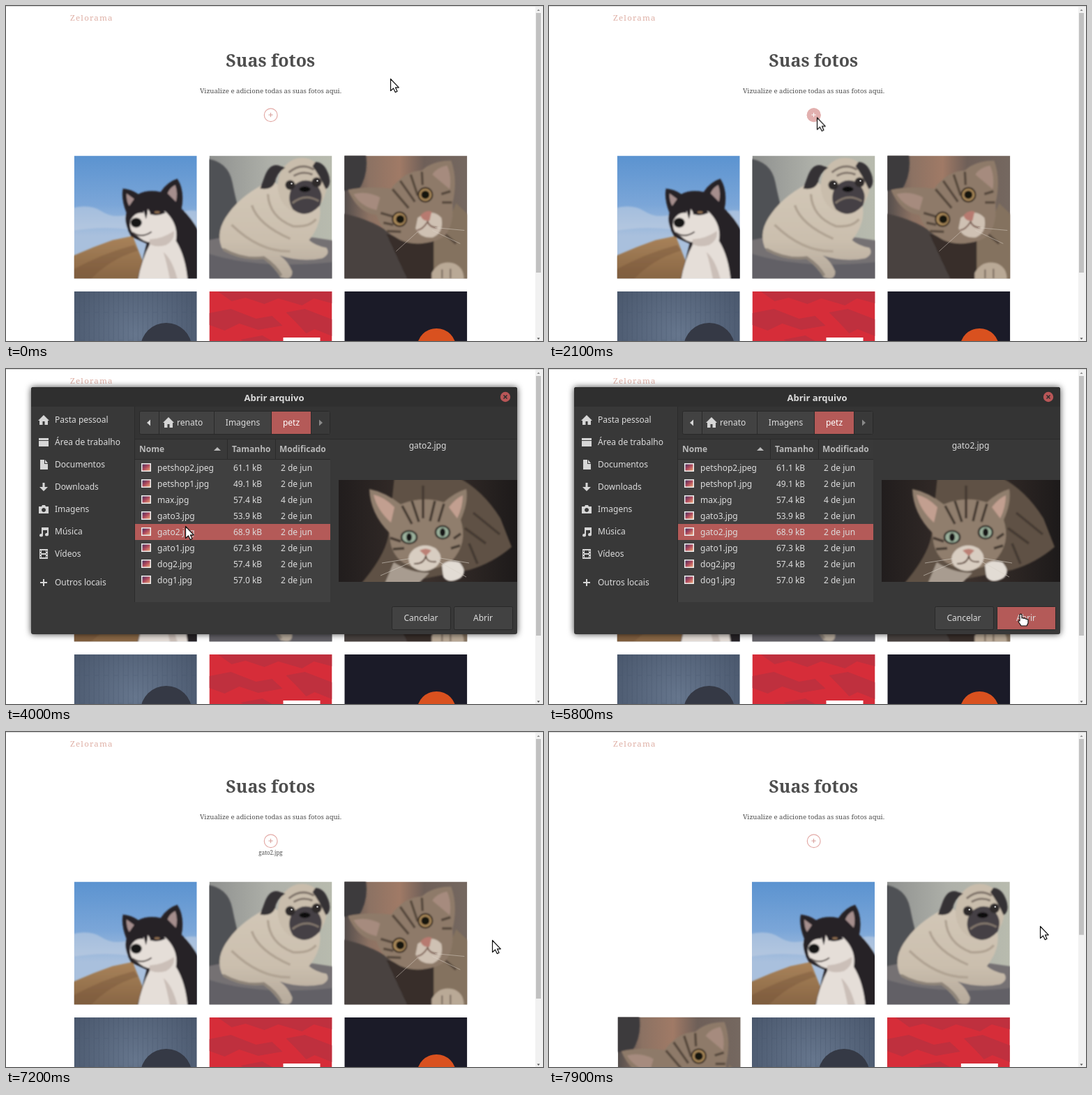
Write an HTML page that moves like this. It is 770 px wide and 480 px high and loops after 8 s.

```html
<!DOCTYPE html>
<html lang="pt-BR">
<head>
<meta charset="utf-8">
<title>Suas fotos</title>
<style>
@property --p { syntax: "<number>"; inherits: true; initial-value: 0; }
html, body { margin: 0; width: 100%; height: 100%; overflow: hidden; background: #fff; }
svg { display: block; }
#stage { width: 770px; height: 480px; }
.page { font-family: "Noto Serif", serif; fill: #4e4e4e; }
.mid { text-anchor: middle; }
.dialog { font: 12px "Noto Sans", sans-serif; fill: #dcdcdc; }
.bold { font-weight: 700; }
.edge { stroke: #292929; fill: #424242; }
.icon { fill: #d6d6d6; }
.shadow { filter: drop-shadow(0 0 5px rgba(0,0,0,.75)); }

/* one shared 8 s clock, hard changes unless a keyframe says otherwise */
.dialog, .hover, .file, .bar, .thumb, #grid, .pick, .first, .second, .press, .arrow, .hand, .cursor {
  animation: 8s step-end infinite;
}
.dialog { animation-name: dialog; }
.hover { animation-name: hover; }
.file { animation-name: file; }
.bar { animation-name: bar; transform-origin: 92px 0; }
.thumb { animation-name: thumb; transform-origin: 0 10px; }
#grid { animation-name: reflow; }
.pick { animation-name: pick; }
.first { animation-name: first; }
.second { animation-name: second; }
.press { animation-name: press; }
.arrow { animation-name: arrow; }
.hand { animation-name: press; }
.cursor { animation-name: cursor; }

/* tiles slide one slot further as --p goes from 0 to 1 */
.tile {
  --dc: 1; --dr: 0;
  transform: translate(
    calc(97.7px + (var(--c) + var(--p) * var(--dc)) * 193.8px),
    calc(214.5px + (var(--r) + var(--p) * var(--dr)) * 194.4px));
}
.tile.wrap { --dc: -2; --dr: 1; }

@keyframes dialog {
  0% { opacity: 0 } 27.5% { opacity: .55 } 28.75% { opacity: 1 }
  73.75% { opacity: .6 } 75% { opacity: .2 } 76.25%, 100% { opacity: 0 }
}
@keyframes hover { 0% { opacity: 0 } 16.25% { opacity: 1 } 75%, 100% { opacity: 0 } }
@keyframes file { 0% { opacity: 0 } 77.5% { opacity: 1 } 93.75%, 100% { opacity: 0 } }
@keyframes bar {
  0% { transform: scaleX(0) } 91.25% { transform: scaleX(.35) }
  92.5% { transform: scaleX(1) } 93.75%, 100% { transform: scaleX(0) }
}
@keyframes thumb { 0% { transform: none } 93.75%, 100% { transform: scaleY(.755) } }
@keyframes reflow {
  0% { --p: 0 } 95% { --p: .216 } 96.25% { --p: .758 }
  97.5% { --p: .939 } 98.75%, 100% { --p: .9974 }
}
@keyframes pick { 0% { transform: none } 50%, 100% { transform: translateY(92px) } }
@keyframes first { 0% { opacity: 1 } 50%, 100% { opacity: 0 } }
@keyframes second { 0% { opacity: 0 } 50%, 100% { opacity: 1 } }
@keyframes press { 0% { opacity: 0 } 66.25% { opacity: 1 } 76.25%, 100% { opacity: 0 } }
@keyframes arrow { 0% { opacity: 1 } 66.25% { opacity: 0 } 76.25%, 100% { opacity: 1 } }
@keyframes cursor {
  0% { transform: translate(551px,104px); animation-timing-function: steps(4) }
  5% { transform: translate(470px,130px); animation-timing-function: steps(5) }
  11.25% { transform: translate(399px,155px); animation-timing-function: steps(8) }
  21.25% { transform: translate(384px,159.5px) }
  37.5% { transform: translate(284px,222px); animation-timing-function: steps(4) }
  42.5%, 52.5% { transform: translate(257px,225px) }
  52.5% { animation-timing-function: steps(9) }
  63.75% { transform: translate(628px,336px) }
  66.25%, 76.25% { transform: translate(678px,352px) }
  76.25% { animation-timing-function: steps(2) }
  78.75%, 83.75% { transform: translate(682px,345px) }
  83.75% { animation-timing-function: steps(5) }
  90% { transform: translate(697px,298px); animation-timing-function: steps(4) }
  95%, 100% { transform: translate(704px,278px) }
}
</style>
</head>
<body>
<svg id="stage" viewBox="0 0 770 480">
<defs>
  <linearGradient id="sky" x2="0" y2="1"><stop stop-color="#5b93d0"/><stop offset=".4" stop-color="#7ba6d8"/><stop offset=".65" stop-color="#a9c0dd"/></linearGradient>
  <linearGradient id="hill" x2="0" y2="1"><stop stop-color="#a9835a"/><stop offset="1" stop-color="#866443"/></linearGradient>
  <linearGradient id="wall"><stop stop-color="#8f918f"/><stop offset=".5" stop-color="#aeb0a9"/><stop offset="1" stop-color="#b8bbae"/></linearGradient>
  <linearGradient id="room"><stop stop-color="#554e4c"/><stop offset=".2" stop-color="#8c7263"/><stop offset=".45" stop-color="#a07a66"/><stop offset=".65" stop-color="#6e5f58"/><stop offset="1" stop-color="#756860"/></linearGradient>
  <linearGradient id="dusk"><stop stop-color="#211d1d"/><stop offset=".5" stop-color="#3a302c"/><stop offset="1" stop-color="#1d1a1a"/></linearGradient>
  <linearGradient id="coat" x2="0" y2="1"><stop stop-color="#d2c7b7"/><stop offset=".6" stop-color="#cbbfae"/><stop offset="1" stop-color="#b5a99b"/></linearGradient>
  <radialGradient id="wood" cy=".35" r=".75"><stop stop-color="#66768d"/><stop offset="1" stop-color="#435065"/></radialGradient>
  <linearGradient id="thumbnail" x2="1" y2="1"><stop stop-color="#493060"/><stop offset=".5" stop-color="#b0495c"/><stop offset="1" stop-color="#e9a374"/></linearGradient>
  <filter id="soft"><feGaussianBlur stdDeviation="1.3"/></filter>
  <filter id="soften"><feGaussianBlur stdDeviation=".8"/></filter>
  <pattern id="planks" width="14" height="90" patternUnits="userSpaceOnUse"><path d="M.5 0V90M7.5 0V90M0 30H7M7 70H14" stroke="#35445b" opacity=".22"/></pattern>
  <pattern id="goods" width="24" height="17" patternUnits="userSpaceOnUse">
    <path fill="#d8d5d0" d="M0 0H24V17H0z"/><path fill="#b73b3a" d="M0 2H7V14H0z"/><path fill="#35588c" d="M8 4H14V14H8z"/><path fill="#d5a63c" d="M15 1H19V14H15z"/><path fill="#564b54" d="M20 5H24V14H20zM0 15H24V17H0z"/>
  </pattern>

  <symbol id="husky" viewBox="0 0 176 176">
    <path fill="url(#sky)" d="M0 0H176V176H0z"/>
    <g filter="url(#soft)">
      <path fill="#c3cfe2" opacity=".55" d="M-5 76Q22 68 40 80T84 82V106Q40 100-5 108zM150 82Q164 76 181 80V108H150z"/>
      <path fill="url(#hill)" d="M-5 145L28 131L55 121L84 115L110 181H-5z"/>
      <path fill="#66482f" opacity=".3" d="M-5 165Q40 140 86 128L92 136Q50 148 20 181H-5z"/>
      <path fill="#272427" d="M70 47Q67 62 75 82Q70 95 82 116L104 126L90 181H181V112Q168 88 154 76Q159 50 148 33Q134 37 124 52Q106 48 92 55Q82 48 70 47z"/>
      <path fill="#a58e8d" d="M75 54Q75 66 79 72L86 62zM145 42Q137 46 134 54L146 66Q149 54 145 42z"/>
      <path fill="#e5ded8" d="M99 82Q88 80 81 92Q77 109 91 115Q100 124 110 124Q96 150 91 181H163Q160 144 146 122Q150 98 131 80Q118 74 109 82Q103 68 99 82z"/>
      <path fill="#cbbfb8" d="M108 120Q127 119 143 108Q145 120 132 128Q120 132 108 127zM128 138Q142 150 149 181H138Q134 158 128 138z"/>
      <path fill="#272427" d="M104 56Q108 77 103 91Q98 77 99 57zM109 79Q123 69 131 82Q120 87 109 84z"/>
      <ellipse cx="89" cy="96" rx="8" ry="7" fill="#151416"/>
      <ellipse cx="119" cy="81" rx="4" ry="1.8" fill="#8a6a4d"/>
      <path d="M84 110Q97 119 111 109" fill="none" stroke="#4a403d" stroke-width="2"/>
    </g>
  </symbol>

  <symbol id="pug" viewBox="0 0 176 176">
    <path fill="url(#wall)" d="M0 0H176V176H0z"/>
    <g filter="url(#soft)">
      <path fill="#505155" d="M-5 4Q27 8 33 38T43 78L16 118L-5 126z"/>
      <path fill="#757173" d="M-5 122Q70 103 181 122V181H-5z"/>
      <path fill="#626066" d="M-5 139Q70 164 181 152V181H-5z"/>
      <path fill="url(#coat)" d="M88 36Q48 54 28 82Q8 108 18 132Q43 150 76 146Q94 160 102 174Q119 180 119 166Q113 151 101 143Q132 153 162 147Q174 141 168 132Q152 129 143 121Q163 96 158 70z"/>
      <path d="M84 55Q86 88 120 101Q143 103 153 91M61 71Q70 99 116 119M32 99Q72 138 116 137" fill="none" stroke="#b0a393" stroke-width="3.5"/>
      <path d="M20 134Q48 150 78 146Q96 158 103 172" fill="none" stroke="#8e8479" stroke-width="4"/>
      <ellipse cx="133" cy="43" rx="35" ry="40" fill="#c9bdac"/>
      <path fill="#353134" d="M102 15Q88 9 80 28L73 47Q89 50 94 39Q96 25 109 17zM152 9Q166 9 172 30Q175 43 167 48Q158 28 148 15z"/>
      <path fill="#454044" d="M119 45Q133 30 150 38Q167 53 158 72Q139 92 120 77Q110 62 119 45z"/>
      <circle cx="116" cy="42" r="7" fill="#2e292c"/><circle cx="154" cy="38" r="7" fill="#2e292c"/>
      <path d="M114 24Q132 9 150 20M121 29Q134 21 148 27M119 68Q137 53 157 65" fill="none" stroke="#80746b" stroke-width="3"/>
      <ellipse cx="137" cy="48" rx="8" ry="4" fill="#111"/>
    </g>
    <circle cx="118" cy="40" r="1.3" fill="#ccc"/><circle cx="155" cy="36" r="1.3" fill="#ccc"/>
  </symbol>

  <symbol id="tabby" viewBox="0 0 176 176">
    <path fill="url(#room)" d="M0 0H176V176H0z"/>
    <g filter="url(#soft)">
      <path fill="#3c3b3e" d="M-5-5H30Q36 25 20 50H-5z"/>
      <path fill="#4a4341" d="M-5 82Q45 92 75 118L112 181H-5z"/>
      <path fill="#382f2c" d="M60 112L104 120L140 122L128 181H92z"/>
      <path fill="#84725f" d="M128 120Q152 92 160 68L181 88V181H128z"/>
      <path fill="#8e7a69" d="M5 49Q29 43 67 47Q86 22 111 21Q126 7 153 7Q163 34 155 68Q158 112 133 121Q96 133 72 116Q51 105 46 85Q19 82 5 49z"/>
      <path fill="#a68b7e" d="M13 55Q33 50 51 60L46 78Q24 73 13 55zM147 14Q132 17 126 27L151 48Q154 29 147 14z"/>
      <path fill="none" stroke="#57483d" stroke-width="3.5" d="M69 48L92 75M80 36L101 66M95 27L105 57M111 23L112 42M52 82L69 87M56 96L70 99M61 108L81 109M139 55L152 51M140 67L154 67M145 113L160 126"/>
      <path fill="#cfc1b3" d="M105 89Q126 74 139 89Q143 110 127 117Q109 119 102 104z"/>
      <g stroke="#30261f" stroke-width="2" fill="#a98858"><circle cx="79" cy="91" r="10"/><circle cx="116" cy="56" r="10"/></g>
      <circle cx="80" cy="91" r="6" fill="#17120f"/><circle cx="116" cy="56" r="6" fill="#17120f"/>
      <path fill="#b77a70" d="M109 86Q116 77 125 80L122 93Q113 95 109 86z"/>
      <path d="M119 93Q121 103 133 103M119 95Q112 106 104 107" fill="none" stroke="#7a5b50" stroke-width="2"/>
      <path fill="#b9a996" d="M125 168Q136 149 156 154Q173 160 171 181H125z"/>
      <path d="M140 163V176M152 162V176" stroke="#75665a" stroke-width="2"/>
    </g>
    <path d="M126 107L166 126M130 103L172 107M105 109L74 137" stroke="#ddd3c9" stroke-width=".5"/>
  </symbol>

  <symbol id="planked" viewBox="0 0 176 176">
    <path fill="url(#wood)" d="M0 0H176V176H0z"/><path fill="url(#planks)" d="M0 0H176V176H0z"/>
    <circle cx="132" cy="82" r="37" fill="#353945"/>
  </symbol>
  <symbol id="crimson" viewBox="0 0 176 176">
    <path fill="#d62d39" d="M0 0H176V176H0z"/>
    <path fill="#bf303e" d="M12 0H176V17L150 10L133 20L99 10L79 18L52 9L32 14zM110 30L137 25L176 40V64L151 54L139 60L123 43zM0 31L31 25L67 39L90 35L105 49L70 55L43 46L22 56L0 48zM45 69L76 63L99 76L67 82z"/>
    <path fill="#fff" d="M106 66h53v53h-53z"/>
  </symbol>
  <symbol id="navy" viewBox="0 0 176 176">
    <path fill="#1b1b28" d="M0 0H176V176H0z"/><circle cx="132" cy="81" r="28" fill="#d9511f"/>
  </symbol>
</defs>

<path fill="#fff" d="M0 0H770V480H0z"/>
<path fill="#d9d9d9" d="M0 0H770V1H0z"/>
<g class="page">
  <text x="92" y="21" font-size="11.5" letter-spacing="1.2" fill="#dfb0a6">Zelorama</text>
  <text class="mid bold" x="379.2" y="86.5" font-size="24.96">Suas fotos</text>
  <text class="mid" x="379.5" y="125" font-size="9.6">Vizualize e adicione todas as suas fotos aqui.</text>
  <circle cx="379.7" cy="156.2" r="9.4" fill="#fff" stroke="#e3aaa6" stroke-width="1.2"/>
  <path d="M376.5 156H382.7M379.6 152.9V159.1" stroke="#d79c98"/>
  <g class="hover"><circle cx="379.7" cy="156.2" r="10" fill="#e2b0af"/><path d="M376.5 156H382.7M379.6 152.9V159.1" stroke="#fff"/></g>
  <text class="mid file" x="379.5" y="176" font-size="8">gato2.jpg</text>
  <path class="bar" fill="#e7b4b0" d="M92 190H668V193H92z"/>
</g>

<g id="grid">
  <g class="tile" style="--c:0;--r:0"><use href="#husky" width="176" height="176"/></g>
  <g class="tile" style="--c:1;--r:0"><use href="#pug" width="176" height="176"/></g>
  <g class="tile wrap" style="--c:2;--r:0"><use href="#tabby" width="176" height="176"/></g>
  <g class="tile" style="--c:0;--r:1"><use href="#planked" width="176" height="176"/></g>
  <g class="tile" style="--c:1;--r:1"><use href="#crimson" width="176" height="176"/></g>
  <g class="tile wrap" style="--c:2;--r:1"><use href="#navy" width="176" height="176"/></g>
</g>

<path fill="#f1f1f1" d="M759 1H770V480H759z"/>
<path class="thumb" fill="#c1c1c1" d="M760 10H767V382H760z"/>
<path fill="#8b8b8b" d="M761.5 7L763.5 4.5L765.5 7z"/><path fill="#505050" d="M761.5 475.5H765.5L763.5 478z"/>

<g class="dialog">
  <rect class="shadow" x="36" y="26" width="697" height="354" rx="3" fill="#383838"/>
  <path fill="#2f2f2f" d="M36 54V29Q36 26 39 26H730Q733 26 733 29V54z"/>
  <path fill="#343434" d="M185 54H733V100H185z"/>
  <path fill="#404040" d="M185 130H465V334H185z"/>
  <path fill="#393939" d="M185 101H465V129H185z"/>
  <path d="M184.5 54V334M185 100.5H733M185 129.5H465M317.5 101V129M386.5 101V129" stroke="#2b2b2b"/>
  <text class="mid bold" x="384.5" y="45.5" font-size="13">Abrir arquivo</text>
  <circle cx="716" cy="40" r="7.2" fill="#b95657"/>
  <path d="M713.5 37.5l5 5m0-5l-5 5" stroke="#2f2f2f" stroke-width="1.6"/>

  <g id="places"></g>

  <rect class="edge" x="191.5" y="60.5" width="273" height="33" rx="2"/>
  <path fill="#b45a58" d="M381 61H437V93H381z"/>
  <path fill="#393939" d="M438 61H464V93H438z"/>
  <path d="M219.5 61V93M298.5 61V93M380.5 61V93M437.5 61V93" stroke="#292929"/>
  <path class="icon" d="M207 72.5V81.5L202 77z"/><path fill="#8a8a8a" d="M449 72.5V81.5L454 77z"/>
  <path class="icon" d="M233 69L225 77H227V84H231.5V79H234.5V84H239V77H241z"/>
  <text x="245" y="81">renato</text>
  <text class="mid" x="339.5" y="81">Imagens</text>
  <text class="mid" x="409" y="81" fill="#fff">petz</text>

  <g class="bold" fill="#b9b9b9">
    <text x="191" y="119">Nome</text><text x="324" y="119">Tamanho</text><text x="392" y="119">Modificado</text>
    <path d="M298 117L303 112L308 117z"/>
  </g>
  <path class="pick" fill="#b45a58" d="M185 130H465V153H185z"/>
  <g id="files"></g>

  <g class="first">
    <text class="mid" x="604.5" y="114">petshop2.jpeg</text>
    <svg x="477" y="160" width="256" height="144" viewBox="0 0 256 144">
      <path fill="#c8cfc9" d="M0 0H256V144H0z"/>
      <g filter="url(#soften)">
        <path fill="#6f9b75" d="M-5-5H38L64 29V44L-5 36zM261-5H205L168 30V43L261 25z"/>
        <path fill="#92809f" d="M-5 34L63 43V86L-5 94zM145 45L261 23V76L145 63z"/>
        <path fill="#a9b0ab" d="M-5 94L88 77H155L261 111V149H-5z"/>
        <path fill="#5e6362" d="M64 43H146V86H64z"/><path fill="#c9d2cf" d="M68 46H85V82H68zM93 55H114V82H93z"/>
        <path fill="#363a3b" d="M116 50H143V82H116z"/>
        <path fill="url(#goods)" d="M-5 33L60 46V96L37 108L32 149H-5zM146 43L261 34V149H163L144 88z"/>
        <path fill="#b9905f" d="M74 82H93V105H74z"/><path fill="#e0b645" d="M83 106L107 98L114 122L92 129zM182 118L206 106L221 137L194 144z"/>
        <path fill="#e8e6df" d="M132 113L154 105L165 139H137zM0 94L22 87L34 117L6 124zM216 116L237 108L254 144H220z"/>
        <path d="M102 9L148 7M91 20L145 19" stroke="#fff" stroke-width="3"/><path d="M19 9L58 18M43 7L37 20" stroke="#484e4c" stroke-width="3"/>
      </g>
    </svg>
  </g>
  <g class="second">
    <text class="mid" x="604.5" y="114">gato2.jpg</text>
    <svg x="477" y="159" width="256" height="146" viewBox="0 0 256 146">
      <path fill="url(#dusk)" d="M0 0H256V146H0z"/>
      <g filter="url(#soften)">
        <path fill="#5f5145" d="M80-5H168Q205 12 232 55L248 96Q221 119 187 129L72 151H30Q65 111 71 81z"/>
        <path fill="#907e6d" d="M44 13Q66 17 89 35Q119 22 151 32Q166 18 183 13Q186 33 175 57Q186 91 162 116Q127 139 92 118Q73 105 73 76Q45 48 44 13z"/>
        <path fill="#c29f90" d="M50 21Q65 24 80 39L75 61Q55 43 50 21zM178 22Q167 27 158 39L170 55Q178 39 178 22z"/>
        <path fill="none" stroke="#453a32" stroke-width="3.5" d="M91 37L105 63M105 30L115 60M121 8V55M138 30L131 59M151 34L143 60M74 83L89 88M78 99L94 98M165 84L175 77M161 98L174 94M181 69L211 91M193 47L231 78M187 91L199 120"/>
        <path fill="#d8cdc1" d="M108 99Q123 89 139 98Q153 111 140 124Q123 137 105 124Q94 111 108 99z"/>
        <path fill="#e2dcd4" d="M148 122Q156 113 173 118Q186 132 174 141Q158 150 150 139z"/>
        <path fill="#a89c90" d="M79 118Q102 133 130 133L112 151H65z"/>
        <g fill="#9bb19c" stroke="#262522" stroke-width="2.5"><ellipse cx="101" cy="82" rx="11" ry="9"/><ellipse cx="149" cy="75" rx="10" ry="9"/></g>
        <g fill="#141414"><ellipse cx="101" cy="82" rx="4" ry="6"/><ellipse cx="149" cy="75" rx="4" ry="6"/></g>
        <path fill="#bb8074" d="M116 101Q125 96 133 101L125 109z"/>
        <path d="M125 108Q126 119 140 117M125 109Q122 121 108 120" fill="none" stroke="#644d42" stroke-width="2"/>
      </g>
      <path d="M106 112L62 119M108 116L60 137M140 111L187 119M140 115L183 139" stroke="#d7d0c7" stroke-width=".6"/>
    </svg>
  </g>

  <rect class="edge" x="553.5" y="340.5" width="84" height="33" rx="2"/>
  <rect class="edge" x="642.5" y="340.5" width="84" height="33" rx="2"/>
  <path class="press" fill="#b45a58" d="M643 341H726V373H643z"/>
  <text class="mid" x="595" y="361">Cancelar</text><text class="mid" x="684" y="361">Abrir</text>
</g>

<g class="cursor" fill="#fff" stroke="#111" stroke-width="1.2" stroke-linejoin="round">
  <path class="arrow" d="M.5 .5V17.5L4.5 14L7.2 19.6L10 18.3L7.4 12.8H12.3z"/>
  <path class="hand" d="M-3 0Q-1.5 -1.5 0 0V5L2 4.5L3 5.5L5 5L6 6.5Q9 6 9 8V12L7 16H-1L-5 10Q-5 8 -3 9z"/>
</g>
</svg>

<script>
const house = "M0-7L-8 1H-6V7H-1.5V2H1.5V7H6V1H8z";
const places = [
  ["Pasta pessoal", house],
  ["Área de trabalho", "M-7-6H7V-3H-7zM-7-2H7V6H-7z"],
  ["Documentos", "M-5-7H1V-1H6V7H-5zM2-7L6-2H2z"],
  ["Downloads", "M-1.5-6H1.5V0H6L0 6L-6 0H-1.5z"],
  ["Imagens", "M-7-4H-3L-2-6H2L3-4H7V6H-7zM0-2A3 3 0 1 0 .1-2z"],
  ["Música", "M-3-6H7V4A2.5 2.2 0 1 1 5 2V-2H-1V5A2.5 2.2 0 1 1-3 3z"],
  ["Vídeos", "M-6-7H6V7H-6zM-3-5V-1H3V-5zM-3 1V5H3V1zM-5-5V-3H-4V-5zM-5-1V1H-4V-1zM-5 3V5H-4V3zM4-5V-3H5V-5zM4-1V1H5V-1zM4 3V5H5V3z"],
  ["Outros locais", "M-1-5H1V-1H5V1H1V5H-1V1H-5V-1H-1z"]
];
const files = [
  ["petshop2.jpeg", "61.1"], ["petshop1.jpg", "49.1"], ["max.jpg", "57.4"], ["gato3.jpg", "53.9"],
  ["gato2.jpg", "68.9"], ["gato1.jpg", "67.3"], ["dog2.jpg", "57.4"], ["dog1.jpg", "57.0"]
];
const fill = (id, html) => document.getElementById(id).innerHTML = html;

fill("places", places.map(([name, icon], i) => {
  const y = 73 + 32 * i + (i === 7 ? 9 : 0);
  return `<path class="icon" fill-rule="evenodd" transform="translate(54 ${y})" d="${icon}"/><text x="70" y="${y + 4}">${name}</text>`;
}).join(""));

fill("files", files.map(([name, size], i) => `<g transform="translate(0 ${23 * i})">
  <path fill="#eee" d="M194 135H208V147H194z"/><path fill="url(#thumbnail)" d="M195.5 136.5H206.5V145.5H195.5z"/>
  <text x="217" y="146">${name}</text><text x="326" y="146">${size} kB</text>
  <text x="394" y="146">${name === "max.jpg" ? 4 : 2} de jun</text></g>`).join(""));
</script>
</body>
</html>
```
